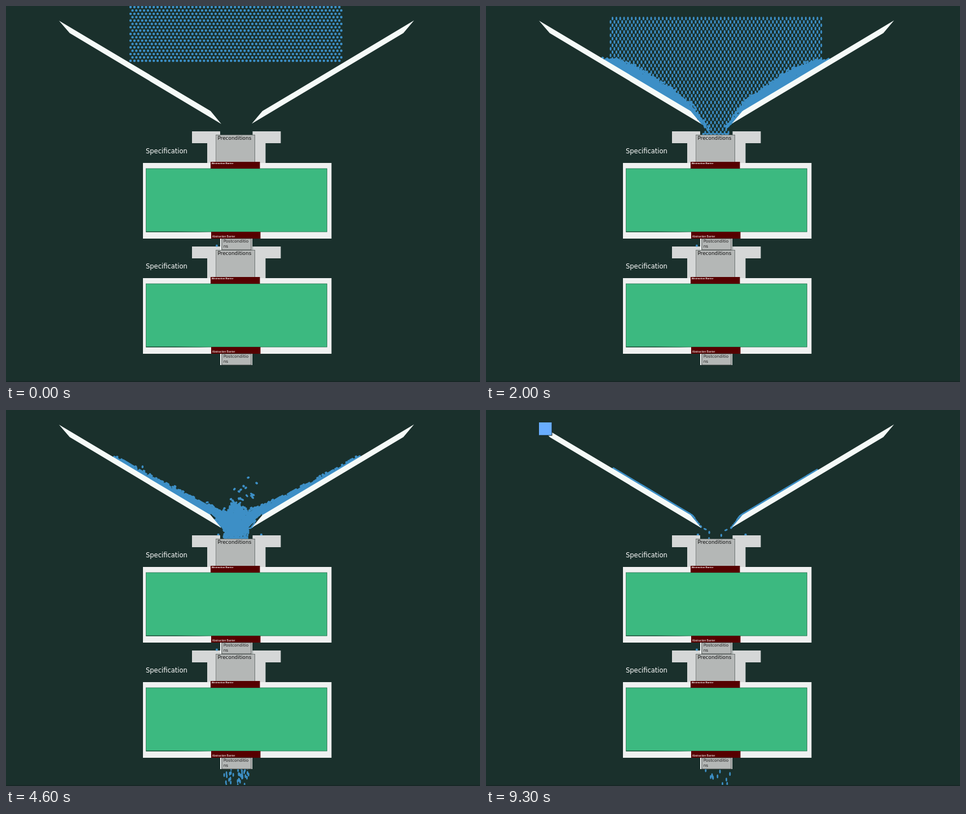
Write an HTML page with a canvas that moves like this. It is 841 px wide and 666 px high and loops after 9400 ms.

```html
<!DOCTYPE html>
<html lang="en">
<head>
<meta charset="utf-8">
<title>Specification flow</title>
<style>
  html, body { margin: 0; width: 100%; height: 100%; overflow: hidden; background: #1a302c; }
  canvas, svg { position: absolute; left: 0; top: 0; width: 841px; height: 666px; }
  text { font-family: "DejaVu Sans", sans-serif; }
  .tiny { font-family: "Liberation Sans", Arial, sans-serif; fill: #fff; }
</style>
</head>
<body>
<canvas id="water" width="841" height="666"></canvas>
<svg viewBox="0 0 841 666">
  <defs>
    <g id="unit">
      <path fill="#d5d7d7" d="M330 222H380V228H373V278H357V243H330ZM437.500 222H487.500V243H460.500V278H442V228H437.500Z"/>
      <rect x="243" y="278" width="334.500" height="134" fill="#f0f1f1"/>
      <rect x="248.500" y="288" width="321" height="112" fill="#3cb980" stroke="#27704f" stroke-width=".8"/>
      <path fill="#1e5a40" d="M248.500 399H300L364 400.400H248.500Z"/>
      <rect x="372.500" y="228.500" width="69" height="48" fill="#b4b7b6" stroke="#6f7573" stroke-width=".8"/>
      <rect x="363" y="276" width="87.500" height="12" fill="#560000"/>
      <rect x="364" y="400" width="87.500" height="12" fill="#560000"/>
      <rect x="380" y="412" width="57" height="20" fill="#f5f7f7"/>
      <rect x="382.800" y="412" width="52.400" height="20" fill="#b4b7b6" stroke="#333a38" stroke-width=".9"/>
      <text x="375.500" y="236.600" font-size="8.900" fill="#111">Preconditions</text>
      <text x="248" y="261" font-size="11.500" fill="#fff">Specification</text>
      <text x="385.700" y="419.300" font-size="7.350" fill="#222">Postconditio</text>
      <text x="385.700" y="428" font-size="7.350" fill="#222">ns</text>
      <text class="tiny" x="364.800" y="280" font-size="4.250" font-weight="bold">Abstraction Barrier</text>
      <text class="tiny" x="365.800" y="410.400" font-size="4.900">Abstraction Barrier</text>
    </g>
  </defs>
  <rect y="664" width="841" height="2" fill="#172826"/>
  <path fill="#f5faf8" d="M94 26L363 186L382 209L113 48ZM724 25.500L455 186L436 208.500L705 48Z"/>
  <use href="#unit" y="204"/>
  <use href="#unit"/>
  <circle cx="374" cy="424.500" r="2" fill="#3d8fc6"/>
  <g id="box" visibility="hidden">
    <rect x="95" y="23" width="22.500" height="22.500" fill="#10201e"/>
    <rect x="94" y="22" width="22.500" height="22.500" fill="#69adff"/>
  </g>
</svg>
<script>
const LOOP = 9400, FRAME = 100, SUB = 6, DT = FRAME / 1000 / SUB;
const GRAVITY = 66, GAP = 2.9, RADIUS = 2.2, FRICTION = 0.38, MID = 409;
const ROWS = 36, COLS = 55, N = ROWS * COLS;
const CELL = 3, GW = 282, GH = 132, TOP = 130;

const ctx = document.getElementById("water").getContext("2d");
const box = document.getElementById("box");
const [x, y, px, py, vx, vy, caught, outX, delay] =
  Array.from({ length: 9 }, () => new Float64Array(N));
const head = new Int32Array(GW * GH), next = new Int32Array(N);
let frame, time, left;

const clamp = (v, lo, hi) => Math.max(lo, Math.min(hi, v));

function reset() {
  let seed = 7;
  const rnd = () => (seed = (seed * 16807) % 2147483647) / 2147483647;
  frame = time = 0;
  left = N;
  for (let i = 0; i < N; i++) {
    const row = Math.floor(i / COLS), col = i % COLS;
    x[i] = 221 + col * 6.86 + (row % 2) * 3.43 + (rnd() - 0.5) * 0.1;
    y[i] = 97 - row * 5.94;
    vx[i] = vy[i] = 0;
    caught[i] = -1;
    outX[i] = rnd() < 0.55 ? 387 + rnd() * 20 : 409 + rnd() * 24;
    delay[i] = 1.65 + 1.2 * rnd() ** 3;
  }
}

// How much water should still be above the lid
function target(t) {
  if (t < 2.05) return N;
  if (t < 5) return N + (170 - N) * (t - 2.05) / 2.95;
  return Math.max(0, 170 * (6.6 - t) / 1.6);
}

// Push overlapping drops apart
function separate() {
  head.fill(-1);
  for (let i = 0; i < N; i++) {
    if (caught[i] >= 0) continue;
    const cx = clamp(Math.floor(x[i] / CELL), 1, GW - 2);
    const cy = clamp(Math.floor((y[i] + TOP) / CELL), 1, GH - 2);
    for (let gy = cy - 1; gy <= cy + 1; gy++) {
      for (let gx = cx - 1; gx <= cx + 1; gx++) {
        for (let j = head[gy * GW + gx]; j >= 0; j = next[j]) {
          const dx = x[i] - x[j], dy = y[i] - y[j], d2 = dx * dx + dy * dy;
          if (d2 >= GAP * GAP || d2 < 1e-9) continue;
          const d = Math.sqrt(d2), k = 0.4 * (GAP - d) / d;
          x[i] += dx * k; y[i] += dy * k;
          x[j] -= dx * k; y[j] -= dy * k;
        }
      }
    }
    const c = cy * GW + cx;
    next[i] = head[c];
    head[c] = i;
  }
}

// Both funnel sides share one rule, mirrored about the middle
function contain(i) {
  const side = x[i] < MID ? 1 : -1;
  let u = MID + side * (x[i] - MID);
  const pu = MID + side * (px[i] - MID);
  const slope = (u - 94) * 0.511 - (y[i] - 26) * 0.859;
  const lip = (u - 363) * 0.772 - (y[i] - 186) * 0.637;
  const under = (u - 113) * 0.511 - (y[i] - 48) * 0.859;
  if (slope < 1 && lip < 1 && under > 0) {
    const onSlope = slope >= lip;
    const nx = onSlope ? 0.511 : 0.772, ny = onSlope ? -0.859 : -0.637;
    const depth = 1 - Math.max(slope, lip);
    const along = (y[i] - py[i]) * nx - (u - pu) * ny;
    const drag = clamp(along, -FRICTION * depth, FRICTION * depth);
    u += nx * depth + ny * drag;
    y[i] += ny * depth - nx * drag;
  }
  if (y[i] > 209) u = Math.max(u, 385);
  if (y[i] > 227) y[i] = 227;
  x[i] = MID + side * (u - MID);
}

function step() {
  time += DT;
  for (let i = 0; i < N; i++) {
    vy[i] += GRAVITY * DT;
    px[i] = x[i];
    py[i] = y[i];
    x[i] += vx[i] * DT;
    y[i] += vy[i] * DT;
  }
  for (let k = 0; k < 3; k++) {
    separate();
    for (let i = 0; i < N; i++) if (caught[i] < 0) contain(i);
  }
  for (let i = 0; i < N; i++) {
    if (caught[i] >= 0) continue;
    vx[i] = clamp((x[i] - px[i]) / DT, -160, 160);
    vy[i] = clamp((y[i] - py[i]) / DT, -50, 240);
    const excess = left - target(time);
    if (excess > 0 && y[i] > 226.5 - Math.min(14, excess * 0.1)) {
      caught[i] = time;
      left--;
      vx[i] = 0;
      vy[i] = Math.max(vy[i], 90);
    }
  }
}

function drop(cx, cy, dx, dy) {
  const s = Math.min(1.9, 1 + Math.hypot(dx, dy) / 300);
  const a = Math.atan2(dy, dx), rx = RADIUS * s;
  ctx.moveTo(cx + rx * Math.cos(a), cy + rx * Math.sin(a));
  ctx.ellipse(cx, cy, rx, RADIUS / s, a, 0, Math.PI * 2);
}

function paint() {
  ctx.clearRect(0, 0, 841, 666);
  ctx.fillStyle = "#3d8fc6";
  ctx.beginPath();
  for (let i = 0; i < N; i++) {
    if (caught[i] < 0 || y[i] < 232) {
      drop(x[i], y[i], vx[i], vy[i]);
      continue;
    }
    const age = time - caught[i] - delay[i];
    if (age > 0 && age < 0.4) {
      drop(outX[i], 628 + 150 * age + 33 * age * age, 0, 150 + GRAVITY * age);
    }
  }
  // Two drops stranded on the ledges
  if (time > 2.6) {
    drop(376 + 2 * Math.exp((3.2 - time) / 0.8), 221, 0, 0);
    drop(462 - 13 * Math.exp((3.2 - time) / 2.5), 221, 0, 0);
  }
  ctx.fill();
}

// The flow pauses three times
function flowFrame(f) {
  return f - clamp(f - 24, 0, 4) - (f >= 43) - (f >= 49);
}

let shown = -1;
function tick() {
  const f = Math.floor(((performance.now() - start) % LOOP) / FRAME);
  if (f !== shown) {
    shown = f;
    const goal = flowFrame(f);
    if (goal < frame) reset();
    for (; frame < goal; frame++) for (let k = 0; k < SUB; k++) step();
    paint();
    box.setAttribute("visibility", f >= 85 ? "visible" : "hidden");
  }
  requestAnimationFrame(tick);
}

reset();
const start = performance.now();
tick();
</script>
</body>
</html>
```
